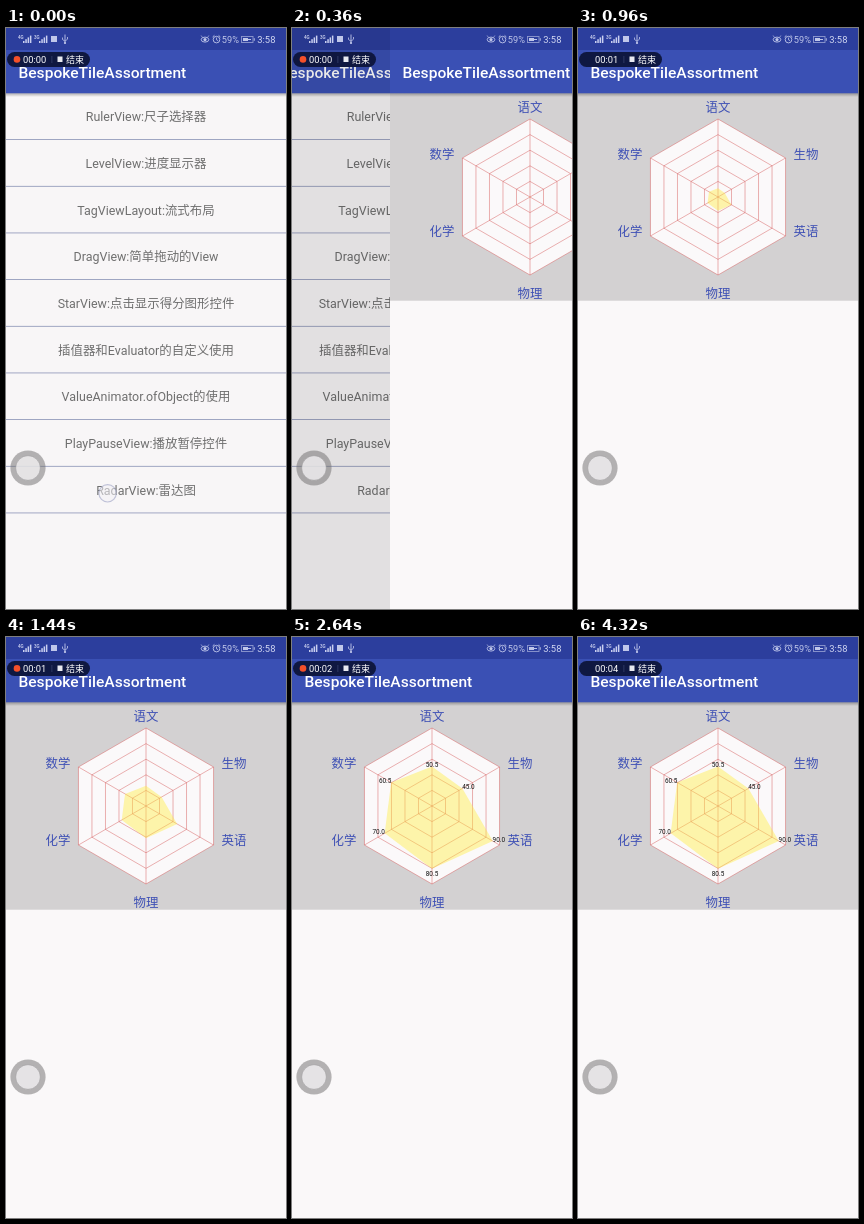
These frames come from a looping animation (280x581 px, 4440 ms). An HTML page with a canvas:

```html
<!DOCTYPE html>
<html lang="zh-CN">
<head>
<meta charset="utf-8">
<title>Radar chart demo</title>
<style>
html, body { margin: 0; width: 100%; height: 100%; overflow: hidden; background: #f9f7f8; }
canvas { display: block; width: 280px; height: 581px; }
</style>
</head>
<body>
<canvas id="stage"></canvas>
<script>
const W = 280, H = 581, LOOP = 4440, STEP = 120;
const FONT = 'Roboto, "Noto Sans CJK SC", "Noto Sans CJK", sans-serif';
const TITLE = 'BespokeTileAssortment';
const ROWS = [
  'RulerView:尺子选择器', 'LevelView:进度显示器', 'TagViewLayout:流式布局',
  'DragView:简单拖动的View', 'StarView:点击显示得分图形控件',
  '插值器和Evaluator的自定义使用', 'ValueAnimator.ofObject的使用',
  'PlayPauseView:播放暂停控件', 'RadarView:雷达图'
];
const DP = 7 / 9;
const BAR_END = 84 * DP, ROW_H = 60 * DP;
// clockwise from the top: name, score, name position
const AXES = [
  ['语文', 50.5, 140, 79], ['生物', 45, 228, 126], ['英语', 90, 228, 203.5],
  ['物理', 80.5, 140, 265], ['化学', 70, 52, 203.5], ['数学', 60.5, 52, 126]
];
const CX = 140, CY = 169, R = 78;
const WEB = 'rgba(212,88,88,.6)';

const canvas = document.getElementById('stage');
const ctx = canvas.getContext('2d');
const dpr = window.devicePixelRatio || 1;
canvas.width = W * dpr;
canvas.height = H * dpr;

const clamp = v => Math.max(0, Math.min(1, v));

// cubic-bezier(.4, 0, .2, 1)
function fastOutSlowIn(t) {
  let lo = 0, hi = 1;
  for (let i = 0; i < 24; i++) {
    const s = (lo + hi) / 2, u = 1 - s;
    if (1.2 * u * u * s + 0.6 * u * s * s + s * s * s < t) lo = s; else hi = s;
  }
  return 3 * (1 - lo) * lo * lo + lo * lo * lo;
}

function rect(x, y, w, h, color) {
  ctx.fillStyle = color;
  ctx.fillRect(x, y, w, h);
}

function text(str, x, y, size, color, align = 'left', weight = 400) {
  ctx.font = `${weight} ${size}px ${FONT}`;
  ctx.textAlign = align;
  ctx.fillStyle = color;
  ctx.fillText(str, x, y);
}

function disc(x, y, r, fill, stroke, width = 1) {
  ctx.beginPath();
  ctx.arc(x, y, r, 0, Math.PI * 2);
  if (fill) { ctx.fillStyle = fill; ctx.fill(); }
  if (stroke) { ctx.strokeStyle = stroke; ctx.lineWidth = width; ctx.stroke(); }
}

function line(color, width, ...pts) {
  ctx.beginPath();
  for (let i = 0; i < pts.length; i += 2) ctx.lineTo(pts[i], pts[i + 1]);
  ctx.strokeStyle = color;
  ctx.lineWidth = width;
  ctx.stroke();
}

function corner(i, k) {
  const a = i * Math.PI / 3;
  return [CX + R * k * Math.sin(a), CY - R * k * Math.cos(a)];
}

function hexPath(scale) {
  ctx.beginPath();
  for (let i = 0; i < 6; i++) ctx.lineTo(...corner(i, scale(i)));
  ctx.closePath();
}

function appBar() {
  rect(0, 0, W, BAR_END, '#3a50b4');
  rect(0, 0, W, 22, '#2c3e9d');
  const g = ctx.createLinearGradient(0, BAR_END, 0, 69);
  g.addColorStop(0, 'rgba(0,0,0,.28)');
  g.addColorStop(1, 'rgba(0,0,0,0)');
  rect(0, BAR_END, W, 69 - BAR_END, g);
  text(TITLE, 16 * DP, 49.7, 20 * DP, '#fff', 'left', 500);
}

function listPage() {
  rect(0, 0, W, H, '#f8f6f7');
  ROWS.forEach((row, i) => {
    const y = BAR_END + ROW_H * i;
    text(row, 140, y + 28, 16 * DP, '#6f6f6f', 'center');
    rect(0, y + ROW_H - DP, W, DP, '#868fb4');
  });
  appBar();
}

function radarPage(grow) {
  rect(0, 0, W, H, '#faf8f9');
  rect(0, 65, W, 207.7, '#d3d1d2');
  hexPath(() => 1);
  ctx.fillStyle = '#fbf9fa';
  ctx.fill();

  ctx.strokeStyle = WEB;
  ctx.lineWidth = DP;
  for (let ring = 1; ring <= 5; ring++) {
    hexPath(() => ring / 5);
    ctx.stroke();
  }
  for (let i = 0; i < 6; i++) line(WEB, DP, CX, CY, ...corner(i, 1));

  hexPath(i => AXES[i][1] / 100 * grow);
  ctx.fillStyle = 'rgba(255,235,59,.42)';
  ctx.fill();

  AXES.forEach(([name, score, x, y], i) => {
    text(name, x, y + 4.6, 16 * DP, '#3f51b5', 'center');
    if (grow < 1) return;
    const [px, py] = corner(i, score / 100);
    const dx = 6 * Math.sign(Math.round(px - CX));
    const dy = i === 3 ? 7.5 : 0.8;
    text(score.toFixed(1), px + dx, py + dy, 6.4, '#111', 'center');
  });
  appBar();
}

function signal(x, label) {
  text(label, x, 10.5, 4.6, '#d4d9f3', 'left', 500);
  for (let i = 0; i < 4; i++) {
    const h = 2 + i * 1.8;
    rect(x + 5 + i * 2.3, 15 - h, 1.5, h, '#c9cff0');
  }
}

function statusIcons() {
  const c = '#c0c7ea';
  signal(12, '4G');
  signal(28, '3G');
  rect(45, 8, 6, 6, c);

  // cable symbol
  line(c, 0.9, 59, 6.5, 59, 15.5);
  line(c, 0.8, 56.5, 9.5, 56.5, 11.5, 59, 13.2, 61.5, 11.2, 61.5, 9);
  disc(59, 15, 1.1, c);

  // eye
  ctx.beginPath();
  ctx.ellipse(199, 11.6, 3.8, 2.5, 0, 0, Math.PI * 2);
  ctx.strokeStyle = c;
  ctx.lineWidth = 0.9;
  ctx.stroke();
  disc(199, 11.6, 1.6, c);
  line(c, 0.8, 196, 8.8, 195.2, 7.6);
  line(c, 0.8, 202, 8.8, 202.8, 7.6);

  // alarm clock
  disc(210.5, 11.6, 3.3, null, c, 0.9);
  line(c, 0.8, 210.5, 9.6, 210.5, 11.8, 212, 12.6);
  line(c, 0.9, 206.6, 9, 208.4, 7.4);
  line(c, 0.9, 214.4, 9, 212.6, 7.4);

  text('59%', 215.8, 15, 9.2, c);

  // battery
  const dim = '#8f99cf';
  ctx.strokeStyle = dim;
  ctx.lineWidth = 0.9;
  ctx.strokeRect(235.5, 8.5, 11.5, 6);
  rect(247.6, 10.2, 1.4, 2.6, dim);
  rect(237, 10, 5, 3, c);
  line(c, 1, 241, 11.5, 245, 11.5);

  text('3:58', 269.4, 15, 9.4, '#d4d9f3', 'right');
}

function recorder(t) {
  ctx.beginPath();
  ctx.roundRect(1, 24, 83, 15, 7.5);
  ctx.fillStyle = 'rgba(12,20,56,.93)';
  ctx.fill();
  const blinkOff = t >= 840 && (t - 840) % 1080 < 480;
  if (!blinkOff) disc(11, 31.4, 3.3, '#f4502a');
  const sec = [720, 1800, 2880, 3720].filter(s => t >= s).length;
  text('00:0' + sec, 17, 35, 9.3, '#fff');
  rect(45.5, 28, 0.8, 7, '#36406c');
  rect(51.5, 28.5, 5, 5.5, '#e8e9f0');
  text('结束', 60, 35, 9, '#fff');
}

function floatButton() {
  disc(22, 440, 17.6, 'rgba(112,110,111,.51)');
  disc(22, 440, 12.3, 'rgba(246,244,245,.75)', 'rgba(150,148,149,.6)', 0.8);
}

function draw(t) {
  ctx.setTransform(dpr, 0, 0, dpr, 0, 0);
  const slide = fastOutSlowIn(clamp((t - 158) / 482));
  const x = Math.round(W * (1 - slide));
  const grow = (1 - Math.cos(Math.PI * clamp((t - 200) / 2440))) / 2;

  if (x > 0) {
    const lag = Math.pow(slide, 3.63);
    ctx.save();
    ctx.translate(-Math.round(121 * lag), 0);
    listPage();
    ctx.restore();
    rect(0, 0, x, H, `rgba(0,0,0,${0.43 * lag})`);
  }
  if (x < W) {
    ctx.save();
    ctx.translate(x, 0);
    radarPage(grow);
    ctx.restore();
  }
  statusIcons();
  recorder(t);
  floatButton();
  if (t < STEP) disc(101.6, 465.3, 8.7, 'rgba(242,241,246,.55)', 'rgba(155,160,195,.6)', 1.1);
}

const start = performance.now();
function tick() {
  const t = (performance.now() - start) % LOOP;
  draw(Math.floor(t / STEP) * STEP);
  requestAnimationFrame(tick);
}
tick();
</script>
</body>
</html>
```
